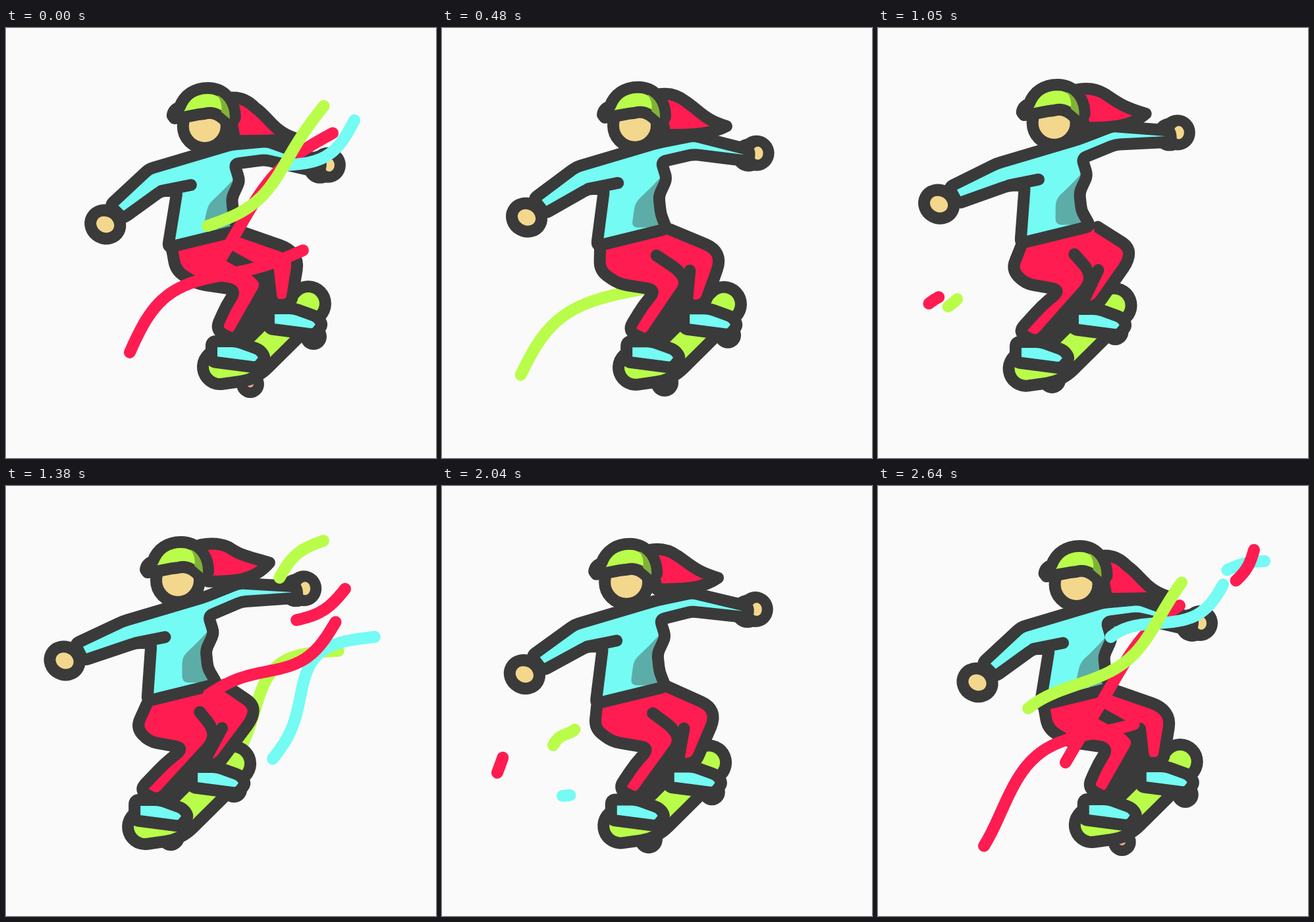
Write an HTML page with a canvas that moves like this. It is 653 px wide and 652 px high and loops after 2.67 s.

```html
<!DOCTYPE html>
<html lang="en">
<head>
<meta charset="utf-8">
<title>Skater</title>
<style>
  html, body { margin: 0; width: 100%; height: 100%; overflow: hidden; background: #fafafa; }
  canvas { display: block; width: 653px; height: 652px; }
</style>
</head>
<body>
<canvas id="stage" width="653" height="652"></canvas>
<script>
const LOOP = 2670, LINE = 18, TAU = 2 * Math.PI;
const DARK = '#3a3a3a', CYAN = '#74fbf3', TEAL = '#5cada8', RED = '#ff1c50',
      LIME = '#b9fd4a', OLIVE = '#82b138', SKIN = '#f3d78d';
const ctx = document.getElementById('stage').getContext('2d');
ctx.lineJoin = ctx.lineCap = 'round';

const clamp = x => Math.min(1, Math.max(0, x));
const mix = (a, b, k) => a + (b - a) * k;

// Sway between the right pose (0) and the left pose (1), with a lead in degrees.
const sway = (t, lead) => (1 - Math.cos(t / LOOP * TAU + lead * TAU / 360)) / 2;

// Apply a point rule to a flat list of coordinates.
function warp(pts, rule) {
  const out = [];
  for (let i = 0; i < pts.length; i += 2) out.push(...rule(pts[i], pts[i + 1]));
  return out;
}

const shift = (pts, dx, dy) => warp(pts, (x, y) => [x + dx, y + dy]);

function turn(pts, [cx, cy], degrees) {
  const c = Math.cos(degrees * TAU / 360), s = Math.sin(degrees * TAU / 360);
  return warp(pts, (x, y) => [cx + (x - cx) * c - (y - cy) * s, cy + (x - cx) * s + (y - cy) * c]);
}

function paint(fill, stroke, width = LINE) {
  if (fill) { ctx.fillStyle = fill; ctx.fill(); }
  if (stroke) { ctx.strokeStyle = stroke; ctx.lineWidth = width; ctx.stroke(); }
}

// Polygon or polyline with softened corners.
function shape(p, r, closed = true) {
  const n = p.length / 2, at = i => [p[(i + n) % n * 2], p[(i + n) % n * 2 + 1]];
  const toward = (a, b) => {
    const d = Math.hypot(b[0] - a[0], b[1] - a[1]) || 1, k = Math.min(r, d / 2) / d;
    return [mix(a[0], b[0], k), mix(a[1], b[1], k)];
  };
  ctx.beginPath();
  if (!closed) ctx.moveTo(...at(0));
  for (let i = closed ? 0 : 1; i < (closed ? n : n - 1); i++) {
    const c = at(i);
    ctx.lineTo(...toward(c, at(i - 1)));
    ctx.quadraticCurveTo(...c, ...toward(c, at(i + 1)));
  }
  if (closed) ctx.closePath(); else ctx.lineTo(...at(n - 1));
}

function oval(x, y, rx, ry, fill, stroke, angle = 0) {
  ctx.beginPath();
  ctx.ellipse(x, y, rx, ry, angle, 0, 7);
  paint(fill, stroke);
}

function shifted(x, y, draw) {
  ctx.save();
  ctx.translate(x, y);
  draw();
  ctx.restore();
}

// ---- Ribbons: wavy lines, trimmed from both ends over their life ----
const trails = [];
const headAt = age => (1 - Math.cos(Math.PI * clamp(age / 0.9))) / 2;
const tailAt = age => clamp((age - 0.25) / 0.75) ** 2;

// At time `seen` the ribbon spans the two given spots; `arc` and `swell` are
// half and full waves across that span, and the path runs on beyond it.
function trail(color, front, seen, age, [x0, y0, x1, y1], arc, swell = 0, life = 400) {
  const q = tailAt(age), span = headAt(age) - q;
  const dx = x1 - x0, dy = y1 - y0, d = Math.hypot(dx, dy);
  const point = f => {
    const u = (f - q) / span;
    const off = (arc * Math.sin(Math.PI * u) + swell * Math.sin(TAU * u)) / d;
    return [x0 + dx * u + dy * off, y0 + dy * u - dx * off];
  };
  trails.push({ color, front, life, point, start: seen - age * life });
}

function drawTrails(t, front) {
  for (const r of trails) {
    const age = (t - r.start + LOOP) % LOOP / r.life;
    if (r.front !== front || age <= 0 || age >= 1) continue;
    ctx.beginPath();
    for (let i = 0; i <= 40; i++) ctx.lineTo(...r.point(mix(tailAt(age), headAt(age), i / 40)));
    paint(null, r.color);
  }
}

trail(LIME, false, 480, 0.5, [119, 527, 310, 395], 37, 2);

trail(LIME, false, 780, 0.7, [232, 409, 427, 219], -36, -10);
trail(RED, false, 780, 0.45, [149, 480, 270, 300], 15, -8);
trail(CYAN, false, 780, 0.52, [110, 433, 335, 295], -25, 27);
trail(LIME, true, 780, 0.38, [132, 427, 248, 295], 25, -4);

trail(LIME, false, 1380, 0.7, [345, 420, 503, 250], 46, -13);
trail(CYAN, false, 1380, 0.68, [404, 415, 558, 229], 38, -18);
trail(LIME, true, 1380, 0.93, [414, 142, 482, 83], 11);
trail(RED, true, 1380, 0.93, [438, 204, 515, 156], -10);
trail(RED, true, 1380, 0.8, [305, 318, 500, 207], -18, 11);

trail(LIME, false, 1770, 0.6, [232, 378, 451, 217], 25, 17);
trail(LIME, false, 1770, 0.95, [516, 199, 573, 186], 3, 0, 330);
trail(RED, false, 1770, 0.95, [532, 199, 566, 152], -5, 0, 330);

trail(LIME, false, 2310, 0.98, [529, 87, 549, 70], 3, 0, 330);
trail(CYAN, false, 2310, 0.75, [350, 310, 545, 148], 62, 2);
trail(RED, false, 2310, 0.78, [310, 262, 526, 117], -44, 9);
trail(RED, false, 2310, 0.35, [97, 496, 247, 402], -19);
trail(LIME, false, 2310, 0.35, [119, 488, 228, 345], 20);
trail(CYAN, true, 2310, 0.5, [181, 452, 387, 267], 62, -5);

trail(CYAN, true, 2640, 0.95, [527, 129, 587, 114], 4, 0, 330);
trail(RED, true, 2640, 0.95, [541, 146, 571, 97], -5, 0, 330);
trail(RED, true, LOOP, 0.76, [320, 360, 495, 160], 23, -4);
trail(RED, true, LOOP, 0.62, [187, 494, 449, 338], 40, 14);
trail(CYAN, true, LOOP, 0.89, [425, 208, 529, 140], -22);
trail(LIME, true, LOOP, 0.8, [303, 301, 482, 119], -25, -8);

// ---- Skater: drawn in the right pose, bent by joints toward the left one ----
const ELBOW = [217, 214], SHOULDER = [342, 177];

function drawHair(t, p) {
  const tip = 18 - 36 * p + 5 * Math.cos(3 * TAU * t / LOOP);
  const root = -44 + tip / 4, bend = -35 + tip / 2, base = 16 + tip * 0.45;
  ctx.beginPath();
  ctx.moveTo(34, root);
  ctx.quadraticCurveTo(58, root - 5, 77, bend);
  ctx.bezierCurveTo(98, bend + 14, 105, tip - 10, 139, tip);
  ctx.bezierCurveTo(115, base, 82, base, 46, base);
  ctx.closePath();
  paint(RED, DARK);
}

function drawHead() {
  oval(302, 149, 33, 33, SKIN, DARK);
  ctx.beginPath();
  ctx.moveTo(253, 133);
  ctx.quadraticCurveTo(254, 124, 264, 120);
  ctx.bezierCurveTo(271, 101, 287, 91, 307, 91);
  ctx.bezierCurveTo(330, 91, 348, 109, 348, 136);
  ctx.lineTo(340, 149);
  ctx.bezierCurveTo(329, 133, 315, 126, 302, 130);
  ctx.bezierCurveTo(285, 131, 270, 137, 256, 137);
  ctx.closePath();
  paint(LIME, DARK);
  ctx.beginPath();
  ctx.moveTo(321, 102);
  ctx.quadraticCurveTo(330, 114, 327, 127);
  ctx.lineTo(340, 138);
  ctx.bezierCurveTo(341, 121, 333, 107, 321, 102);
  paint(OLIVE);
}

function drawBoard(p) {
  const wheel = (x, y, r, fill) => oval(x - 7 * p, y - 11 * p, r, r, fill);
  wheel(371, 540, 21, DARK);
  wheel(371, 540, 5, '#f5a596');
  wheel(467, 468, 20, DARK);
  shape([325, 514, 368, 508, 459, 418], 16, false);
  paint(null, DARK, 70);
  paint(null, LIME, 34);
}

function drawShoes() {
  for (const [x, y] of [[87, -50], [0, 0]]) {
    shape(shift([312, 475, 350, 475, 386, 488, 394, 500, 382, 515, 312, 506], x, y), 7);
    paint(CYAN, DARK);
  }
}

function drawLegs(p) {
  // Legs lean: the lower a point, the further it swings with the board.
  const lean = pts => warp(pts, (x, y) => {
    const reach = Math.min(117, 32 + 0.67 * (y - 325) + 0.2 * Math.max(0, x - 350));
    return [x - reach * p, y + (reach - 80) * 0.1 * p];
  });
  shape(lean([398, 370, 408, 435, 395, 445, 350, 470]), 4);
  paint(DARK, DARK);
  shape(lean([352, 307, 430, 334, 444, 353, 433, 420, 404, 420, 398, 368, 335, 345]), 14);
  paint(RED);
  shape(lean([352, 307, 430, 334, 444, 353, 433, 420, 404, 420, 398, 368]), 14, false);
  paint(null, DARK);
  const leg = lean([252, 335, 258, 368, 290, 388, 350, 397, 335, 420, 318, 458,
    348, 474, 397, 388, 382, 369, 340, 346]);
  shape([...leg, ...lean([352, 307])], 12);
  paint(RED);
  shape(leg, 14, false);
  paint(null, DARK);
}

function drawTorso(p) {
  const forearm = pts => turn(pts, ELBOW, 18 * p);
  const arm = pts => turn(pts, SHOULDER, -17 * p);
  const waist = pts => shift(pts, 8 * p, 2 * p);
  const [hx, hy] = arm([489, 208]);
  oval(hx, hy, 27, 27, DARK);
  oval(hx - 12, hy + 3, 25, 25, DARK);
  oval(hx + 2, hy, 8, 10, SKIN);
  const side = [355, 232, 343, 258, 346, 285];
  const body = [
    ...forearm([158, 269]), ...ELBOW, ...SHOULDER, ...arm([397, 172, 479, 202, 476, 219, 393, 200]),
    347, 206, ...side, ...waist([352, 307, 246, 333]),
    260, 247, 236, 247, ...forearm([178, 289])];
  shape(body, 7);
  paint(CYAN);
  shape([350, 225, 328, 248, 307, 268, ...waist([299, 305, 350, 305]), 345, 258], 10);
  paint(TEAL);
  shape(body, 7);
  paint(null, DARK);
  shape([236, 247, 281, 238], 0, false);
  paint(null, DARK);
  oval(...forearm([151, 298]), 23, 21, SKIN, DARK, 0.5);
}

function draw(t) {
  const body = sway(t, 7), board = sway(t, -2), head = sway(t, -9);
  ctx.fillStyle = '#fafafa';
  ctx.fillRect(0, 0, 653, 652);
  drawTrails(t, false);
  shifted(302 - 41 * head, 145 - 6 * head, () => drawHair(t, head));
  shifted(-114 * board, 3 * board, () => drawBoard(board));
  drawLegs(mix(body, board, 0.5));
  shifted(-117 * board, board, drawShoes);
  shifted(-40 * body, -9 * body, () => drawTorso(body));
  shifted(-41 * head, -6 * head, drawHead);
  drawTrails(t, true);
}

const begin = performance.now();
function tick() {
  draw((performance.now() - begin) % LOOP);
  requestAnimationFrame(tick);
}
tick();
</script>
</body>
</html>
```
